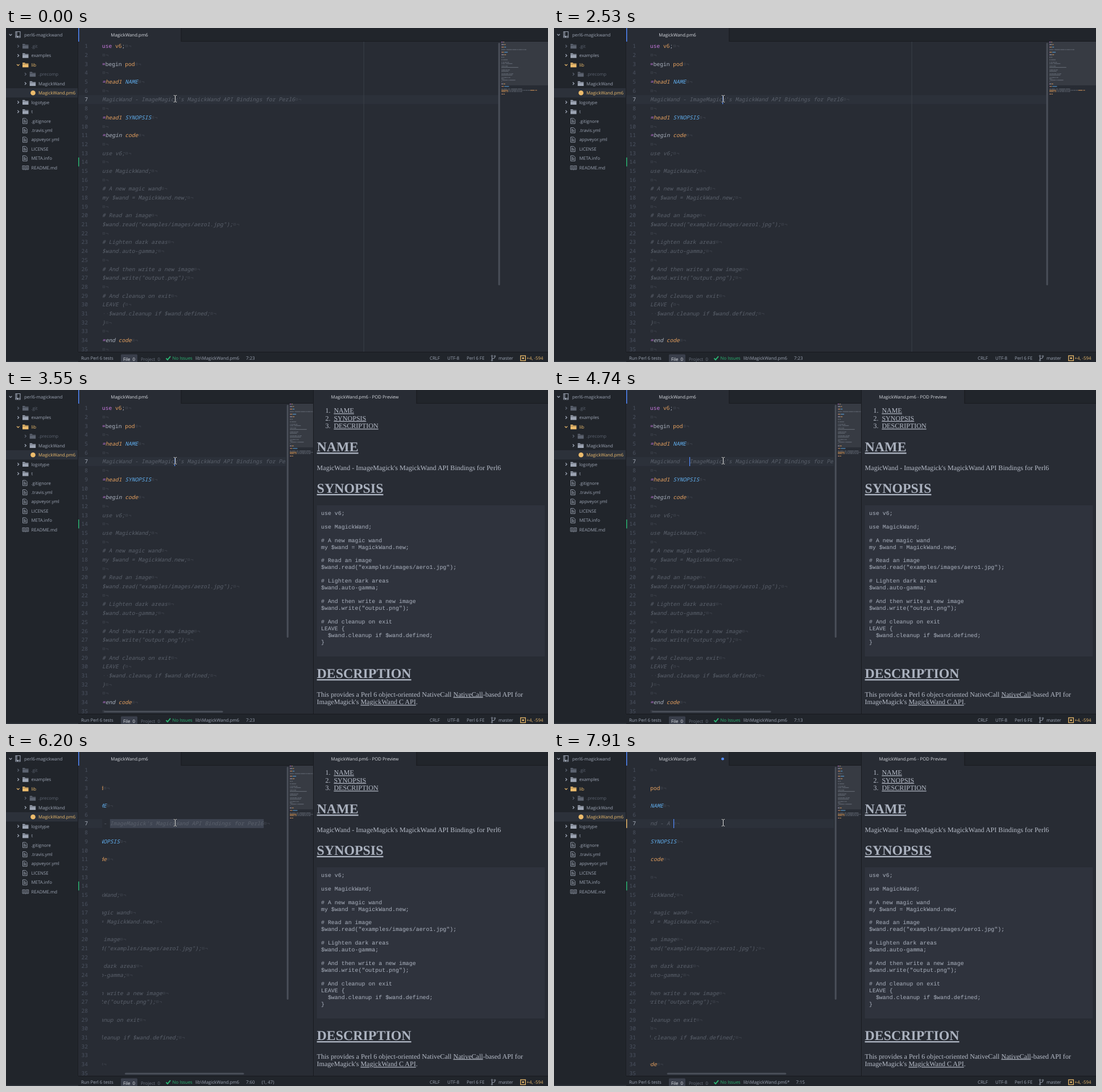
Write an HTML page that moves like this. It is 953 px wide and 588 px high and loops after 8 s.

```html
<!DOCTYPE html>
<html lang="en">
<head>
<meta charset="utf-8">
<title>Pod preview</title>
<style>
html, body { margin: 0; width: 100%; height: 100%; overflow: hidden; background: #282c34; }
svg { display: block; width: 100vw; height: 100vh; }
text { white-space: pre; text-rendering: geometricPrecision; }
.ui { font: 7.85px "Open Sans", "Noto Sans", sans-serif; }
.code { font: 9.587px "Noto Sans Mono", "DejaVu Sans Mono", monospace; }
.it { font-style: italic; }
.pod { font: 12.06px "Liberation Serif", serif; fill: #b6bcc8; }
.head { font-weight: bold; font-size: 23.9px; text-decoration: underline; fill: #abb2bf; }
.link { text-decoration: underline; }
.pre { font: 9.93px "Liberation Mono", monospace; fill: #abb2bf; }
</style>
</head>
<body>
<svg id="stage" viewBox="0 0 953 588" preserveAspectRatio="none"></svg>
<script>
const LOOP = 8000, CHAR = 5.752, ROW = 15.69, LEFT = 169, TOP = 24;
const BG = '#282c34', PANEL = '#21252b', EDGE = '#181a1f', TEXT = '#9da5b4', BLUE = '#528bff',
  YELLOW = '#ecbb6c', DIM = '#5c6370', FAINT = '#434852', GREEN = '#2bb673', ACTIVE = '#2c313a';
const INK = { k: '#c678dd', g: '#abb2bf', o: '#e5a05f', b: '#61afef', c: '#5a606b' };
const FULL = "ImageMagick's MagickWand API Bindings for Perl6";

// A token is [ink, text, italic]; a bare string is an italic comment.
const head = name => [['k', '=', 1], ['o', 'head1 ', 1], ['b', name, 1]];
const lines = [
  [['k', 'use '], ['o', 'v6'], ['g', ';']], '',
  [['k', '='], ['g', 'begin '], ['o', 'pod']], '',
  head('NAME'), '',
  '', '',
  head('SYNOPSIS'), '',
  [['k', '=', 1], ['g', 'begin ', 1], ['o', 'code', 1]], '',
  'use v6;', '', 'use MagickWand;', '',
  '# A new magic wand', 'my $wand = MagickWand.new;', '',
  '# Read an image', '$wand.read("examples/images/aero1.jpg");', '',
  '# Lighten dark areas', '$wand.auto-gamma;', '',
  '# And then write a new image', '$wand.write("output.png");', '',
  '# And cleanup on exit', 'LEAVE {', '  $wand.cleanup if $wand.defined;', '}', '',
  [['k', '=', 1], ['g', 'end ', 1], ['o', 'code', 1]], '',
  head('DESCRIPTION'), '',
  'This provides a Perl 6 object-oriented NativeCall',
  [['o', 'NativeCall-based', 1], ['c', ' API for ImageMagick with the rest of the wand docs', 1], ['o', ' MagickWand C API', 1]],
  [['o', 'MagickWand C API', 1], ['c', ' in the same module for use here.', 1]], '',
  [['k', '=', 1], ['o', 'end pod', 1]]
];

const steps = [
  [0, { col: 23, on: 0, link: 0, hand: 0, split: 0, pod: 0, scroll: 0, sel: 0, dirty: 0, tail: FULL }],
  [150, { on: 1 }], [560, { on: 0 }], [860, { on: 1 }],
  [1010, { link: 1, hand: 1 }], [1310, { on: 0 }], [1710, { on: 1 }], [2120, { on: 0 }],
  [2260, { link: 0 }], [2390, { hand: 0 }], [2530, { on: 1 }],
  [2780, { split: 1 }], [3150, { on: 0 }], [3550, { on: 1, pod: 1 }], [3990, { on: 0 }], [4450, { on: 1 }],
  [4740, { col: 13 }], [4990, { col: 11 }], [5250, { col: 12 }], [5670, { on: 0 }], [5790, { col: 13, on: 1 }],
  [6200, { col: 60, on: 0, sel: 1, scroll: 55.2 }],
  [6770, { col: 14, on: 1, sel: 0, scroll: 40, tail: 'A' }],
  [7030, { col: 15, tail: 'A ' }], [7320, { dirty: 1 }], [7480, { on: 0 }], [7910, { on: 1 }]
];

const rect = (x, y, w, h, fill, more = '') =>
  `<rect x="${x}" y="${y}" width="${w}" height="${h}" fill="${fill}" ${more}/>`;
const text = (x, y, s, cls, fill, more = '') =>
  `<text x="${x}" y="${y}" class="${cls}" ${fill ? `fill="${fill}"` : ''} ${more}>${s}</text>`;
const ui = (x, mid, s, fill = TEXT, more) => text(x, mid + 2.9, s, 'ui', fill, more);
const path = (d, stroke, w = 1, fill = 'none') =>
  `<path d="${d}" stroke="${stroke}" stroke-width="${w}" fill="${fill}"/>`;
const clip = (id, x, y, w, h, body) =>
  `<clipPath id="${id}">${rect(x, y, w, h, '#fff')}</clipPath><g clip-path="url(#${id})">${body}</g>`;
const rowTop = n => TOP + ROW * (n - 1);
const tokens = (n, s) => {
  const line = n === 7 ? 'MagicWand - ' + s.tail : lines[n - 1];
  return typeof line === 'string' ? [['c', line, 1]] : line;
};

const chevron = (x, y, open, c) =>
  path(open ? `M${x - 2.3} ${y - 1}l2.3 2.3 2.3-2.3` : `M${x - 1} ${y - 2.3}l2.3 2.3-2.3 2.3`, c, 1.3);
const folder = (x, y, c) =>
  path(`M${x} ${y - 4}h4l1 1.3h5.5v7h-10.5z`, 'none', 0, c) + path(`M${x} ${y - 1.6}h10.5`, PANEL, .5);
const page = (x, y) =>
  path(`M${x + .5} ${y - 4.5}h5l2.6 2.6v6.6h-7.6zM${x + 2} ${y - 1.5}h3M${x + 2} ${y + .4}h4.5M${x + 2} ${y + 2.2}h4.5`, TEXT, .9);
const book = (x, y) =>
  path(`M${x} ${y - 3.3}h4.4l.9.8.9-.8h4.4v6.5h-4.4l-.9.8-.9-.8h-4.4zM${x + 5.3} ${y - 2.5}v6M${x + 1.5} ${y - 1.3}h2.3m-2.3 1.6h2.3m-2.3 1.6h2.3M${x + 6.8} ${y - 1.3}h2.3m-2.3 1.6h2.3m-2.3 1.6h2.3`, TEXT, .8);

// name, depth, kind: d folder, o open folder, f file, b book, p module
const tree = [
  ['.git', 0, 'd', DIM], ['examples', 0, 'd', TEXT], ['lib', 0, 'o', YELLOW],
  ['.precomp', 1, 'd', DIM], ['MagickWand', 1, 'd', TEXT], ['MagickWand.pm6', 1, 'p', YELLOW],
  ['logotype', 0, 'd', TEXT], ['t', 0, 'd', TEXT],
  ['.gitignore', 0, 'f', TEXT], ['.travis.yml', 0, 'f', TEXT], ['appveyor.yml', 0, 'f', TEXT],
  ['LICENSE', 0, 'f', TEXT], ['META.info', 0, 'f', TEXT], ['README.md', 0, 'b', TEXT]
];

function sidebar() {
  let out = rect(0, 0, 127, 588, PANEL) + rect(0, 106, 126, 16.4, ACTIVE) +
    chevron(8, 11.8, 1, TEXT) +
    path('M17 6.5h8v8h-8zM19 6.5v8M17 14.5v2.2h1.5M22 16.7h3v-2.2', TEXT, 1.1) +
    path('M19 14.8h2.6v3l-1.3-1-1.3 1z', 'none', 0, TEXT) + ui(32, 12, 'perl6-magickwand');
  tree.forEach(([name, depth, kind, c], i) => {
    const y = 32 + i * 16.45, x = 29 + depth * 12.7;
    if (kind === 'd' || kind === 'o') {
      out += chevron(x - 7.7, y, kind === 'o', c) + folder(x, y, c) + ui(x + 15.4, y, name, c);
    } else if (kind === 'p') {
      out += `<circle cx="47.5" cy="${y}" r="4.3" fill="${YELLOW}"/>` + ui(57, y, name, c);
    } else {
      out += (kind === 'b' ? book : page)(29, y) + ui(44.5, y, name, c);
    }
  });
  return out + rect(126, 0, 1, 570, EDGE, 'opacity=".6"');
}

function tabs(s) {
  const middle = 'text-anchor="middle"';
  let out = rect(127, 0, 826, 24, PANEL) + rect(127, 23, 826, 1, EDGE) +
    rect(127, 0, 181, 24, BG) + rect(127, 0, 1.5, 24, BLUE) + rect(307.5, 0, 1, 24, EDGE) +
    ui(217, 12, 'MagickWand.pm6', '#d7dae0', middle);
  if (s.dirty) out += `<circle cx="296.6" cy="12.2" r="2.4" fill="${BLUE}"/>`;
  if (s.split) {
    out += rect(541, 0, 180.5, 24, BG) + rect(721.5, 0, 1, 24, EDGE) +
      ui(631, 12, 'MagickWand.pm6 - POD Preview', '#d7dae0', middle);
  }
  return out;
}

function minimap(s) {
  const x = s.split ? 498 : 870, end = s.split ? 540 : 953;
  let out = rect(x, 24, end - x, 77, '#373b43');
  lines.forEach((_, i) => {
    let at = x + 1;
    for (const [ink, str] of tokens(i + 1, s)) {
      for (const m of str.matchAll(/\S+/g)) {
        out += rect((at + m.index * .745).toFixed(2), (24.1 + i * 2.235).toFixed(2),
          (m[0].length * .745).toFixed(2), 1.2, ink === 'c' ? '#6b717c' : INK[ink], 'opacity=".8"');
      }
      at += str.length * .745;
    }
  });
  return clip('map', x, 24, end - x, 546, out);
}

function editor(s) {
  const right = s.split ? 492 : 866, colX = c => LEFT + (c - 1) * CHAR - s.scroll, y7 = rowTop(7);
  let gutter = rect(127, y7, LEFT - 127, ROW, ACTIVE), code = '';
  if (s.sel) code += rect(colX(13), y7, 47 * CHAR, ROW, '#3e4451');
  else code += rect(LEFT, y7, right - LEFT, ROW, ACTIVE);
  for (let n = 1; n <= 35; n++) {
    const base = (rowTop(n) + 11.3).toFixed(2);
    gutter += text(144, base, n, 'code', n === 7 ? '#abb2bf' : '#4b5260', 'text-anchor="end"');
    const spans = tokens(n, s).map(([ink, str, it]) =>
      `<tspan fill="${INK[ink]}" ${it ? 'class="it"' : ''}>${
        str.replace(/^ +/, m => ink === 'c' ? `<tspan fill="${FAINT}">${'·'.repeat(m.length)}</tspan>` : m)}</tspan>`);
    code += text(LEFT - s.scroll, base, spans.join('') + `<tspan fill="${FAINT}">¤¬</tspan>`, 'code');
  }
  gutter += rect(127, rowTop(14), 1.5, ROW, GREEN);
  if (s.dirty) gutter += rect(127, y7, 1.5, ROW, YELLOW);
  if (s.link) code += rect(colX(13), 132.6, 11 * CHAR, 1, INK.b);
  if (s.on) code += rect(Math.round(colX(s.col) + .4), 118, 1.2, 16, BLUE);
  const bar = 'rx="1.5"', grey = '#4a4f59';
  let out = gutter + clip('code', LEFT, 24, right - LEFT, 546, code);
  if (s.split) {
    out += rect(493.7, 26, 3, 410, grey, bar) + rect(172 + s.scroll * .67, 564.7, 209.5, 3, grey, bar);
  } else {
    out += rect(628.6, 24, 1, 546, '#3a3f48') + rect(865.6, 26, 3, 427, grey, bar);
  }
  return out + minimap(s);
}

function preview() {
  const pod = (x, y, str, cls = '') => text(x, y, str, 'pod ' + cls);
  let out = '';
  ['NAME', 'SYNOPSIS', 'DESCRIPTION'].forEach((name, i) => {
    const y = 40.2 + i * 13.5;
    out += pod(561.5, y, i + 1 + '.') + pod(576.4, y, name, 'link') +
      pod(546.6, [108, 181, 507][i], name, 'head');
  });
  out += pod(546.6, 140.6, 'MagicWand - ' + FULL) + rect(546.6, 203, 401, 266, '#2f333d');
  lines.slice(12, 32).forEach((str, i) => out += text(554, 219.7 + i * 11.96, str, 'pre'));
  const link = str => `<tspan class="link">${str}</tspan>`;
  return out +
    pod(546.6, 539.6, `This provides a Perl 6 object-oriented NativeCall ${link('NativeCall')}-based API for`) +
    pod(546.6, 553.3, `ImageMagick's ${link('MagickWand C API')}.`);
}

function status(s) {
  const y = 581.3;
  return rect(127, 570, 826, 18, PANEL) + rect(127, 570, 826, 1, EDGE) +
    rect(0, 586.6, 127, 1, '#3a3f48') +
    ui(132, y, 'Run Perl 6 tests') +
    rect(202, 574.5, 29, 14, '#3a3f4b', 'rx="1.5"') + ui(206, 582.8, 'File&#160; 0', '#e4e7ec') +
    ui(237, 582.8, 'Project&#160; 0', '#69707d') +
    path('M281.5 581.5l2.6 2.6 5-6', GREEN, 1.9) + ui(292.5, y, 'No Issues', GREEN) +
    ui(333, y, 'lib\\MagickWand.pm6' + (s.dirty ? '*' : '')) +
    ui(s.dirty ? 425.5 : 422, y, '7:' + s.col) + (s.sel ? ui(449.5, y, '(1, 47)') : '') +
    ui(745, y, 'CRLF') + ui(776, y, 'UTF-8') + ui(810, y, 'Perl 6 FE') +
    path('M854.5 578.2v6M859.5 578.5v1.3q0 1.7-2.5 1.9t-2.5 1.8', TEXT, 1) +
    [[854.5, 577.4], [854.5, 585], [859.5, 577.8]].map(([cx, cy]) =>
      `<circle cx="${cx}" cy="${cy}" r="1.2" fill="${PANEL}" stroke="${TEXT}" stroke-width=".9"/>`).join('') +
    ui(866, y, 'master') +
    rect(904.8, 577, 8.6, 8.6, 'none', `stroke="${YELLOW}" stroke-width="1.3"`) +
    rect(907.6, 579.8, 3, 3, YELLOW) + ui(915.5, y, '+4, -594', YELLOW);
}

function pointer(s) {
  if (s.hand) {
    return path('M295.6 133v-7.4q0-1.2 1.1-1.2t1.2 1.2v4.2q1.8-.8 2.3.5 1.7-.6 2.2.6 2.9-.5 2.9 1.8 0 3.4-1.6 5.3v1.4h-7v-1.2q-1.4-1.5-3.4-4.6-.6-1.4.5-1.6t1.8 1z', '#000', .8, '#fff');
  }
  const beam = 'M294.8 118.6q2 0 2.7.9.7-.9 2.7-.9M297.5 119.5v10M294.8 130.4q2 0 2.7-.9.7.9 2.7.9';
  return path(beam, '#1a1c20', 2) + path(beam, '#eef0f2', 1);
}

function draw(s) {
  stage.innerHTML = rect(0, 0, 953, 588, BG) + sidebar() + tabs(s) + editor(s) +
    (s.split ? rect(540, 0, 1, 570, EDGE) : '') + (s.pod ? preview() : '') + status(s) + pointer(s);
}

const stage = document.getElementById('stage');
let shown = -1;
function tick() {
  const t = performance.now() % LOOP;
  const past = steps.filter(([at]) => at <= t);
  if (past.length !== shown) {
    shown = past.length;
    draw(Object.assign({}, ...past.map(step => step[1])));
  }
  requestAnimationFrame(tick);
}
tick();
</script>
</body>
</html>
```
